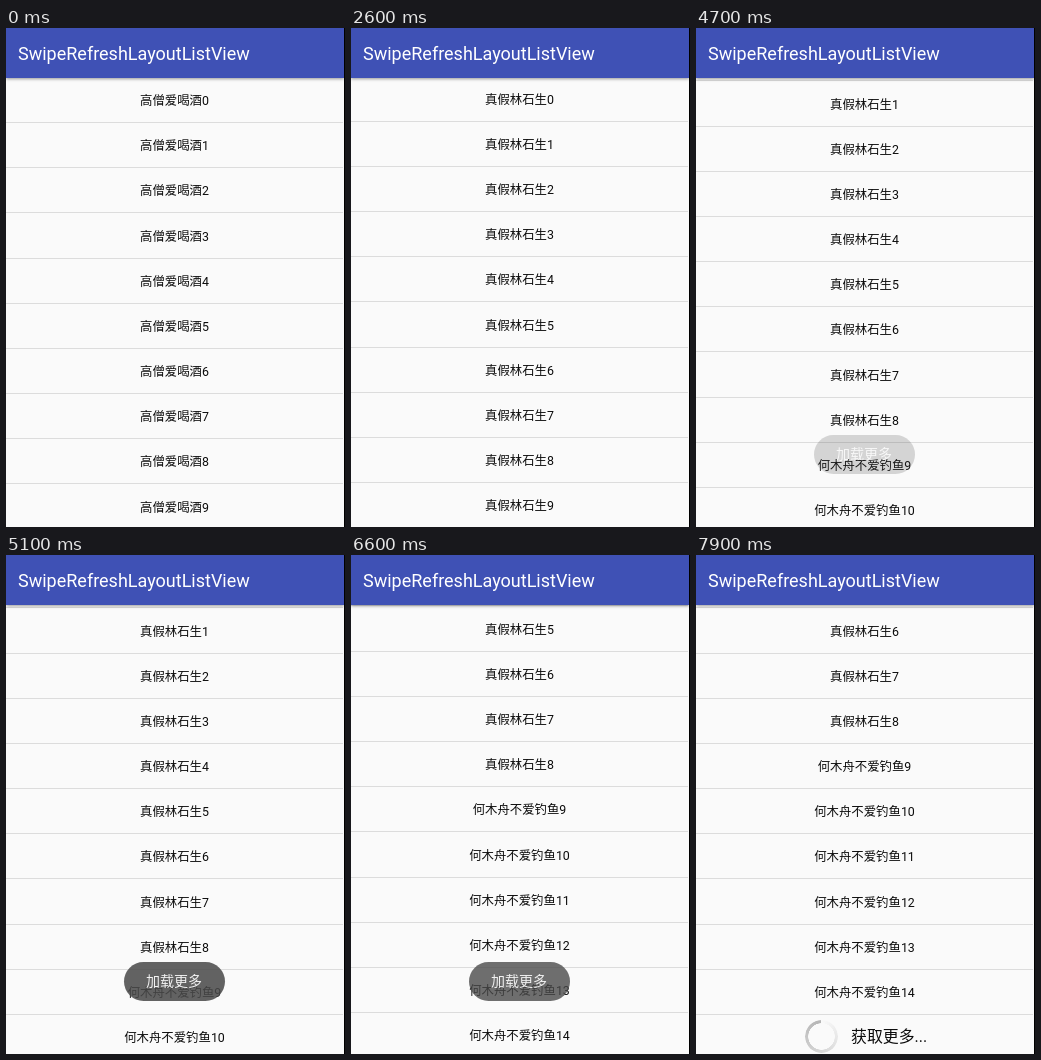
An HTML page for the animation above (8000 ms loop, 339 px wide and 499 px high).

```html
<!DOCTYPE html>
<html lang="zh-CN">
<head>
<meta charset="utf-8">
<title>SwipeRefreshLayoutListView</title>
<style>
  html, body { margin: 0; width: 100%; height: 100%; overflow: hidden; }
  body {
    position: relative;
    background: #fafafa;
    color: #0c0c0c;
    font-family: Roboto, "Noto Sans CJK SC", "Noto Sans CJK", sans-serif;
  }
  #stage { position: absolute; left: 0; top: 0; width: 339px; height: 499px; overflow: hidden; }
  #stage > * { position: absolute; }
  #bar {
    left: 0; top: 0; width: 338px; height: 50px;
    box-sizing: border-box; padding-left: 12px;
    background: #3f51b5; color: #fff;
    font-size: 18px; line-height: 52px; white-space: nowrap;
    box-shadow: 0 1px 3px rgba(0, 0, 0, .4);
  }
  #edge { left: 338px; top: 0; width: 1px; height: 499px; background: #000; }
  #list { left: 0; top: 50px; width: 338px; height: 449px; overflow: hidden; }
  .row {
    position: absolute; left: 0; width: 337px; height: 44px;
    border-bottom: 1px solid #dcdcdc;
    font-size: 12.4px; line-height: 45px; text-align: center; white-space: nowrap;
  }
  #footer { left: 0; top: 460px; width: 338px; height: 39px; background: #fafafa; }
  #ring {
    position: absolute; left: 109px; top: 5px; width: 33px; height: 33px; border-radius: 50%;
    background: conic-gradient(rgba(150, 150, 150, 0), rgba(150, 150, 150, .7));
    -webkit-mask: radial-gradient(circle, transparent 13px, #000 13.5px);
    mask: radial-gradient(circle, transparent 13px, #000 13.5px);
  }
  #more { position: absolute; left: 155px; top: 0; font-size: 15.9px; line-height: 43px; white-space: nowrap; }
  #puck {
    left: 150px; top: 74px; width: 36px; height: 36px; border-radius: 50%;
    background: #fafafa; box-shadow: 0 1px 3px rgba(0, 0, 0, .22);
  }
  #puck svg { display: block; }
  #toast {
    left: 117.5px; top: 407px; width: 101px; height: 39px; border-radius: 20px;
    background: rgba(74, 74, 74, .86); color: #f2f2f2;
    font-size: 14px; line-height: 39px; text-align: center; white-space: nowrap;
  }
</style>
</head>
<body>
<div id="stage">
  <div id="list"></div>
  <div id="footer"><div id="ring"></div><div id="more">获取更多...</div></div>
  <div id="puck">
    <svg width="36" height="36" viewBox="-18 -18 36 36">
      <circle id="arc" r="7.9" fill="none" stroke="#f53d7c" stroke-width="2.3" pathLength="100"/>
    </svg>
  </div>
  <div id="bar">SwipeRefreshLayoutListView</div>
  <div id="toast">加载更多</div>
  <div id="edge"></div>
</div>
<script>
  const LOOP = 8000, STEP = 100, PITCH = 45.17, MAX_ROWS = 15;
  const REFRESHED = 1800, LOADED = 4500;
  const $ = id => document.getElementById(id);
  const within = (t, from, to) => t >= from && t < to;
  const show = (el, on) => { el.style.visibility = on ? 'visible' : 'hidden'; };

  // Linear interpolation through [time, value] points
  function track(t, points) {
    let [t0, v0] = points[0];
    for (const [t1, v1] of points) {
      if (t < t1) return t <= t0 ? v0 : v0 + (v1 - v0) * (t - t0) / (t1 - t0);
      [t0, v0] = [t1, v1];
    }
    return v0;
  }

  const scrollPath = [
    [2500, 0], [2700, 2.6], [2800, 41.6],
    [5800, 41.6], [5900, 58], [6000, 90], [6100, 126.4], [6200, 185], [6300, 224.2],
    [7200, 224.2], [7300, 267.5]
  ];
  const toastPath = [
    [4600, 0], [4700, .25], [4800, .5], [5000, .9], [5100, 1],
    [6500, 1], [6600, .92], [6700, .7], [6800, .35], [6900, 0]
  ];

  const rows = Array.from({ length: MAX_ROWS }, () => {
    const row = document.createElement('div');
    row.className = 'row';
    return $('list').appendChild(row);
  });

  function label(i, t) {
    if (t < REFRESHED) return '高僧爱喝酒' + i;
    return (t >= LOADED && i > 8 ? '何木舟不爱钓鱼' : '真假林石生') + i;
  }

  function drawList(t) {
    const scroll = track(t, scrollPath);
    const count = t < LOADED ? 10 : MAX_ROWS;
    rows.forEach((row, i) => {
      show(row, i < count);
      row.style.top = i * PITCH - scroll + 'px';
      const text = label(i, t);
      if (row.textContent !== text) row.textContent = text;
    });
  }

  function drawFooter(t) {
    const first = within(t, 2800, LOADED);
    show($('footer'), first || t >= 7300);
    const head = first ? 80 + (t - 3800) * .1 : -90 + (t - 7900) * .1;
    $('ring').style.transform = `rotate(${head + 90}deg)`;
  }

  function drawPuck(t) {
    show($('puck'), within(t, 1000, 1900));
    const y = track(t, [[1000, -30], [1100, -12], [1200, 0]]);
    const scale = t < REFRESHED ? 1 : .55;
    $('puck').style.transform = `translateY(${y}px) scale(${scale})`;
    const p = Math.min(1, Math.max(0, (t - 1200) / 666));
    const length = t < 1200 ? 20 + (t - 1000) * .25 : 4 + 76 * (1 - (1 - p) ** 2);
    const arc = $('arc');
    arc.setAttribute('stroke-dasharray', `${length} ${100 - length}`);
    arc.setAttribute('transform', `rotate(${130 + (t - 1700) * .216})`);
    arc.setAttribute('opacity', track(t, [[1000, .4], [1200, 1]]));
  }

  const start = performance.now();
  function frame() {
    const t = Math.floor((performance.now() - start) % LOOP / STEP) * STEP;
    drawList(t);
    drawFooter(t);
    drawPuck(t);
    $('toast').style.opacity = track(t, toastPath);
    requestAnimationFrame(frame);
  }
  frame();
</script>
</body>
</html>
```
